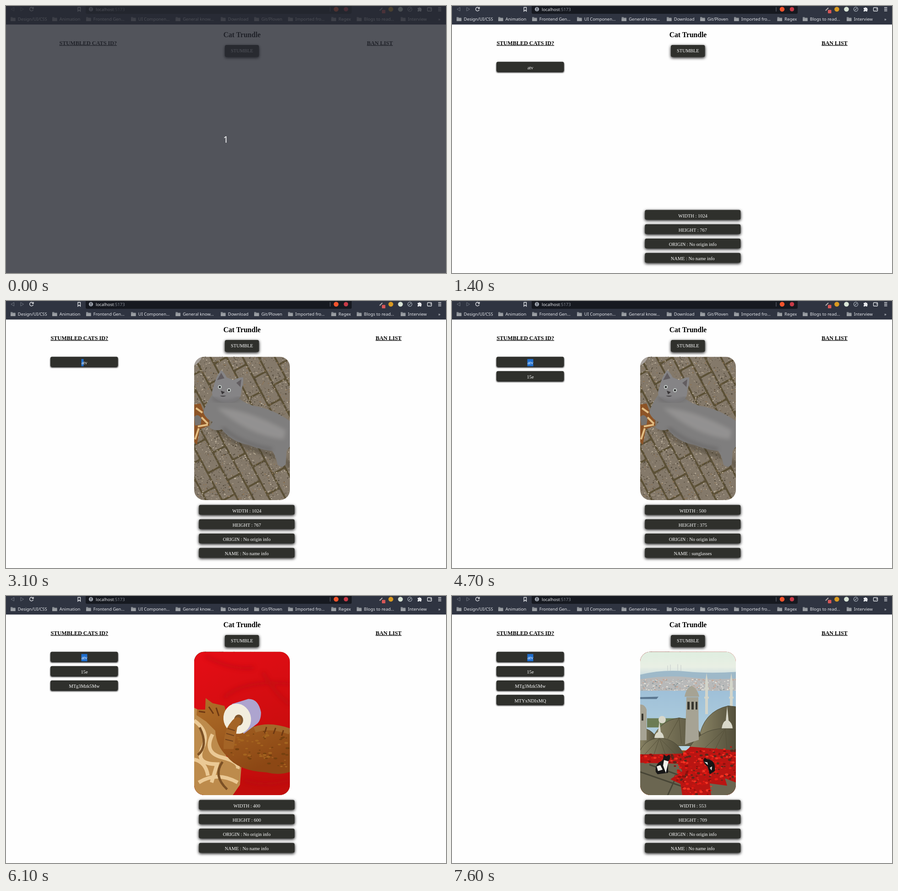
An HTML page for the animation above (8 s loop, 961 by 582 pixels).

```html
<!DOCTYPE html>
<html lang="en">
<head>
<meta charset="utf-8">
<title>Cat Trundle</title>
<style>
html, body { margin: 0; width: 100%; height: 100%; overflow: hidden; background: #fefefe; }
svg { display: block; width: 961px; height: 582px; }
.ui { font: 9.4px "Noto Sans", sans-serif; fill: #e4e6ea; }
.page { font: 10.43px "Liberation Serif", "Times New Roman", serif; text-anchor: middle; }
.title { font-size: 15.65px; font-weight: bold; }
.head { font-size: 12.2px; font-weight: bold; text-decoration: underline; }
.bar { fill: #2f302c; }
.page .light { fill: #fefefe; }
.row .bar { filter: drop-shadow(.3px 2px 1.6px #000); }
.info .bar { filter: drop-shadow(0 2.6px 3.3px #000); }
#button { filter: drop-shadow(0 2.6px 3.3px #000); }

.anim { animation: 8s step-end infinite; }
#count { animation-name: count; }
#button { animation-name: press; }
#left { animation-name: left; }
#right { animation-name: right; }
#details, #row1 { animation-name: at1400; }
#row2 { animation-name: at4700; }
#row3 { animation-name: at6000; }
#row4 { animation-name: at7500; }
#info1 { animation-name: info1; }
#info2 { animation-name: info2; }
#info3 { animation-name: info3; }
#info4 { animation-name: at7500; }
#stones { animation-name: at1500; }
#loading { animation-name: loading; }
#shades { animation-name: at4800; }
#roll { animation-name: at6100; }
#city { animation-name: at7600; }
#mark { animation-name: mark; }

@keyframes count { 0% { visibility: visible } 1.25%, to { visibility: hidden } }
@keyframes left { 0% { transform: none } 17.5%, to { transform: translateX(-19px) } }
@keyframes right { 0% { transform: none } 17.5%, to { transform: translateX(19px) } }
@keyframes at1400 { 0% { visibility: hidden } 17.5%, to { visibility: visible } }
@keyframes at1500 { 0% { visibility: hidden } 18.75%, to { visibility: visible } }
@keyframes at4700 { 0% { visibility: hidden } 58.75%, to { visibility: visible } }
@keyframes at4800 { 0% { visibility: hidden } 60%, to { visibility: visible } }
@keyframes at6000 { 0% { visibility: hidden } 75%, to { visibility: visible } }
@keyframes at6100 { 0% { visibility: hidden } 76.25%, to { visibility: visible } }
@keyframes at7500 { 0% { visibility: hidden } 93.75%, to { visibility: visible } }
@keyframes at7600 { 0% { visibility: hidden } 95%, to { visibility: visible } }
@keyframes info1 { 0%, 58.75%, to { visibility: hidden } 17.5% { visibility: visible } }
@keyframes info2 { 0%, 75%, to { visibility: hidden } 58.75% { visibility: visible } }
@keyframes info3 { 0%, 93.75%, to { visibility: hidden } 75% { visibility: visible } }
@keyframes loading { 0%, 20%, to { visibility: hidden } 18.75% { visibility: visible } }
@keyframes mark { 0% { width: 0 } 38.75% { width: 5px } 40%, to { width: 13px } }
@keyframes press {
  0%, 15%, 56.25%, 73.75%, 88.75%, to { transform: none; filter: drop-shadow(0 2.6px 3.3px #000) }
  13.75%, 55%, 71.25%, 87.5% { transform: translate(.3px, 2.2px); filter: drop-shadow(.9px .9px .4px rgba(0,0,0,.8)) }
}
</style>
</head>
<body>
<svg viewBox="0 0 961 582">
  <defs>
    <clipPath id="frame"><rect width="209" height="312.5" rx="22"/></clipPath>
    <pattern id="bricks" width="62" height="136" patternUnits="userSpaceOnUse" patternTransform="rotate(-28)">
      <rect width="62" height="136" fill="#5b5036"/>
      <g fill="#84796a">
        <rect x="2" y="2" width="27" height="64" rx="3"/><rect x="2" y="70" width="27" height="64" rx="3"/>
        <rect x="33" y="-32" width="27" height="64" rx="3"/><rect x="33" y="36" width="27" height="64" rx="3"/>
        <rect x="33" y="104" width="27" height="64" rx="3"/>
      </g>
    </pattern>
    <linearGradient id="fur" x2="0" y2="1"><stop stop-color="#b07a4d"/><stop offset=".3" stop-color="#9f5c2e"/><stop offset=".65" stop-color="#7c4123"/><stop offset="1" stop-color="#76593d"/></linearGradient>
    <linearGradient id="red" x2=".3" y2="1"><stop stop-color="#e60d16"/><stop offset="1" stop-color="#c20d0c"/></linearGradient>
    <linearGradient id="ginger" x2=".5" y2="1"><stop stop-color="#b0702a"/><stop offset="1" stop-color="#8c4714"/></linearGradient>
    <linearGradient id="sky" x2="0" y2="1"><stop stop-color="#dfeee0"/><stop offset=".55" stop-color="#e9efe4"/><stop offset="1" stop-color="#bfd5de"/></linearGradient>
    <linearGradient id="sea" x2="0" y2="1"><stop stop-color="#9fc0d8"/><stop offset="1" stop-color="#b5d3e0"/></linearGradient>
    <linearGradient id="dome"><stop stop-color="#8b8566"/><stop offset="1" stop-color="#514d39"/></linearGradient>
    <filter id="soft"><feGaussianBlur stdDeviation="4"/></filter>
  </defs>

  <g class="page">
    <text class="title" x="515.5" y="68">Cat Trundle</text>
    <text id="left" class="head anim" x="179.3" y="84.5">STUMBLED CATS ID?</text>
    <text id="right" class="head anim" x="816.6" y="84.5">BAN LIST</text>
    <g id="button" class="anim">
      <rect class="bar" x="478" y="85" width="74.5" height="26" rx="3.5"/>
      <text class="light" x="515.3" y="101.4">STUMBLE</text>
    </g>
    <g id="rows"></g>
    <g id="details" class="anim info"></g>
  </g>

  <g transform="translate(411 121.5)">
    <g id="stones" class="anim" clip-path="url(#frame)">
      <rect width="209" height="313" fill="url(#bricks)"/>
      <g id="gravel"></g>
      <path d="M0 0H17Q12 14 0 19Z" fill="#a8a29d"/>
      <path d="M40 150Q82 190 150 208T205 244" fill="none" stroke="#3b3425" stroke-width="9" opacity=".5" filter="url(#soft)"/>
      <path d="M0 104L14 102 20 118 32 124 33 150 12 158 6 192 0 186Z" fill="#8d5426"/>
      <path d="M4 112l14 10M8 152l22-4M2 180l8-24M16 132l14 14" stroke="#e2bd83" stroke-width="4"/>
      <path d="M0 131Q8 122 16 135L14 148 2 150Z" fill="#77736f"/>
      <path d="M40 82Q22 108 20 122Q26 136 40 142L33 154Q46 164 60 158Q82 186 118 192Q150 204 170 205Q178 215 182 235Q192 245 200 234L202 205 209 196V140Q170 113 130 107Q108 100 100 92Z" fill="#7f7e7e"/>
      <path d="M50 112Q110 112 200 160L196 180Q120 172 50 112Z" fill="#a09f9e" opacity=".6" filter="url(#soft)"/>
      <path d="M62 155Q100 190 170 202" fill="none" stroke="#5d5b5c" stroke-width="7" opacity=".6" filter="url(#soft)"/>
      <path d="M43 63Q48 42 59 29Q67 36 71 45L86 51Q98 44 107 45Q108 60 103 73Q104 92 88 97Q72 103 54 96Q38 88 39 76Z" fill="#858486"/>
      <path d="M50 51L59 35 66 47ZM92 57L103 49 101 66Z" fill="#625d60"/>
      <path d="M40 90Q70 108 102 88" fill="none" stroke="#5a585a" stroke-width="5" opacity=".6" filter="url(#soft)"/>
      <g fill="#c4cbc8"><circle cx="56" cy="66" r="4.2"/><circle cx="76" cy="73" r="4.2"/></g>
      <g fill="#222"><circle cx="56" cy="66" r="2.3"/><circle cx="76" cy="73" r="2.3"/></g>
      <path d="M58 74l9 3-6 5ZM56 85q7 4 14 0" fill="#393638"/>
      <rect id="loading" class="anim" y="150" width="209" height="163" fill="#fefefe"/>
    </g>

    <g id="shades" class="anim" clip-path="url(#frame)">
      <rect width="209" height="313" fill="url(#fur)"/>
      <path d="M0 0H65L48 24 0 24Z" fill="#17100d"/>
      <path d="M44 28Q62 0 80 0H209V42Q170 46 148 38Q100 26 44 28Z" fill="#d9d3c6"/>
      <path d="M85 20Q110 4 130 8M130 30Q160 8 195 12M160 36Q180 22 209 26" fill="none" stroke="#b7ad9b" stroke-width="3"/>
      <path d="M140 76Q168 44 209 36V88Q170 84 150 98Z" fill="#a97450"/>
      <path d="M158 78Q180 54 209 50V82Q180 78 158 78Z" fill="#8a5738" filter="url(#soft)"/>
      <path d="M0 24Q40 28 58 45L40 90 0 98Z" fill="#a96a3d"/>
      <path d="M95 60Q120 40 140 70L132 145H108Z" fill="#8d4b22" filter="url(#soft)"/>
      <path d="M92 45l8 55M107 38l4 65M125 40l-3 65M142 48l-11 50M76 50l13 44" stroke="#7a3d1b" stroke-width="3" opacity=".5" filter="url(#soft)"/>
      <path d="M104 178H136L144 222 106 226Z" fill="#a05f38" filter="url(#soft)"/>
      <path d="M78 242Q100 226 124 236Q150 224 164 240Q150 254 122 252Q94 254 78 242Z" fill="#b08e76" filter="url(#soft)"/>
      <path d="M108 222Q124 214 138 222Q133 235 124 238Q113 234 108 222Z" fill="#9a4a38"/>
      <path d="M124 237V243Q108 251 98 243M124 243Q142 250 152 241" fill="none" stroke="#5c2f22" stroke-width="1.5"/>
      <path d="M0 252Q60 244 100 260Q150 262 184 250V313H0Z" fill="#76583a"/>
      <path d="M180 240Q195 230 209 234V313H186Q190 282 180 240Z" fill="#c2b8a8"/>
      <g id="hairs"></g>
      <g fill="#0d0808" stroke="#e8951f" stroke-width="9">
        <path d="M-8 110Q60 106 84 126Q102 146 95 178Q83 242 35 246Q10 247-8 239Z"/>
        <path d="M217 95Q160 100 146 128Q138 156 150 188Q168 226 217 228Z"/>
      </g>
      <path d="M86 120Q102 150 119 151Q134 149 150 116L145 150 148 184Q138 173 119 173Q104 173 93 192L99 160Z" fill="#e8951f"/>
      <path d="M0 106Q60 103 86 124M150 118Q168 96 209 94" fill="none" stroke="#ffb947" stroke-width="3"/>
    </g>

    <g id="roll" class="anim" clip-path="url(#frame)">
      <rect width="209" height="313" fill="url(#red)"/>
      <path d="M25 10Q80 40 130 35M65 100Q110 60 209 70M150 45Q180 95 209 115M110 280Q150 295 209 280" fill="none" stroke="#b50a12" stroke-width="7" opacity=".5" filter="url(#soft)"/>
      <path d="M0 122L38 142 58 200 74 236 103 252 100 290 84 313H0Z" fill="#bd8b4c"/>
      <path d="M0 150Q35 175 18 210T50 245L38 285M40 180Q20 220 60 230T95 255M10 285Q50 260 95 285M0 235Q25 240 30 270" fill="none" stroke="#ebc995" stroke-width="8"/>
      <path d="M12 165Q32 205 8 225M62 240Q40 270 72 300" fill="none" stroke="#7c5125" stroke-width="5"/>
      <path d="M25 101L40 112 66 118 76 150Q120 165 209 172V262Q185 270 158 263Q95 260 70 226Q48 205 46 172L26 152 5 138 6 126 24 126Z" fill="url(#ginger)"/>
      <path d="M132 170Q165 158 209 174" fill="none" stroke="#a3682b" stroke-width="13"/>
      <path d="M10 130l14 2M32 120l10 15M48 122l6 18M158 164l-4 14M178 166l-5 13M195 171l-4 12" stroke="#6d3812" stroke-width="3"/>
      <g id="spots"></g>
      <path d="M82 114L118 103Q140 102 146 132Q146 151 136 158L108 179Z" fill="#ada4cf"/>
      <ellipse cx="94" cy="146" rx="30" ry="33" transform="rotate(-15 94 146)" fill="#f2edde"/>
      <ellipse cx="97" cy="149" rx="10" ry="12" fill="#80562d"/>
      <path d="M64 212Q64 172 80 154Q92 138 101 145Q106 153 94 165L86 212Z" fill="#a46426"/>
      <path d="M70 178l17 5M73 167l16 5M68 191l17 4" stroke="#70401a" stroke-width="2"/>
    </g>

    <g id="city" class="anim" clip-path="url(#frame)">
      <rect width="209" height="60" fill="url(#sky)"/>
      <path d="M0 50Q50 38 100 43T209 44V95H0Z" fill="#9eb9c9"/>
      <path d="M0 60Q60 50 110 56T209 58V92H0Z" fill="#b8b9b9"/>
      <g id="houses"></g>
      <rect y="85" width="209" height="130" fill="url(#sea)"/>
      <path d="M0 99L40 98 36 103H0Z" fill="#5a7690"/>
      <path d="M60 30V42M66 28V42M82 27V42M89 29V42" stroke="#c3c9c9"/>
      <path d="M15 145H110V165H15Z" fill="#6c7c55"/>
      <g fill="#d3d5ca"><path d="M142 136V66L145 46 148 66V136ZM196 136V66L199 46 202 66V136Z"/><path d="M140 78h10v4h-10zM140 98h10v4h-10zM194 78h10v4h-10zM194 98h10v4h-10z"/></g>
      <g fill="url(#dome)" stroke="#4b4937">
        <path d="M128 190Q138 130 192 118L212 120V190Z"/>
        <path d="M20 205Q38 150 85 144Q128 148 140 205Z"/>
        <path d="M0 165Q24 168 34 185V215H0Z"/>
        <path d="M102 220Q125 168 185 167L212 170V230H102Z"/>
        <path d="M-4 224Q8 190 42 188Q80 190 95 224Z"/>
      </g>
      <path d="M42 188L10 224M42 188L30 224M42 188L55 224M42 188L78 224M186 168L130 220M186 168L160 220M186 168L190 220M85 145L60 190M85 145L90 200" stroke="#555039"/>
      <g fill="#a6a394">
        <path d="M98 202L101 99H127L128 192Z"/><path d="M97 98Q100 80 112 74Q125 80 129 98Z"/>
        <path d="M0 115Q10 114 14 126V193H0Z"/>
      </g>
      <path d="M103 109h5v17h-5zM112 109h5v17h-5zM121 109h4v17h-4zM3 135h4v15h-4z" fill="#37362f"/>
      <g fill="#d9d8ca"><path d="M31 188Q32 178 39 175L42 150 45 175Q51 179 52 188Z"/><path d="M178 167Q180 153 187 150L190 118 193 150Q201 155 202 167Z"/><circle cx="48" cy="148" r="8"/></g>
      <path d="M0 238L60 222 209 248V313H0Z" fill="#6b6651"/>
      <path d="M0 262L110 300M20 246L130 285M60 313L75 280" stroke="#474536" stroke-width="3"/>
      <path d="M0 224L92 222 110 207 209 215V285L185 276 190 292 152 287 155 313H92L88 288 66 278 92 260 82 244 0 242Z" fill="#b91512"/>
      <g id="leaves"></g>
      <path d="M34 262Q31 244 49 237L52 224 57 228 64 224Q68 233 61 239L61 264 38 267Z" fill="#171717"/>
      <path d="M52 236L62 239 56 264 50 248ZM36 250l8-3 5 10-10 3Z" fill="#efefe9"/>
      <path d="M138 236L141 231 147 235Q166 236 163 260L152 267 147 250Q139 245 138 236Z" fill="#141414"/>
      <path d="M140 240l7 1 1 6ZM152 253l5-3-1 9Z" fill="#ddd"/>
    </g>
  </g>

  <g class="ui">
    <rect width="961" height="40.4" fill="#2f3441"/>
    <path d="M174 0H755V14Q755 17 752 17H177Q174 17 174 14Z" fill="#161920"/>
    <g fill="none" stroke="#6d737e"><path d="M17.5 3V11L11 7ZM32 3V11L38.5 7Z"/><path d="M708 2.5V12"/></g>
    <g fill="none" stroke="#e4e6ea" stroke-width="1.3">
      <path d="M59 4.5A4 4 0 1 0 59.5 8M60 2V5.5H56.5"/>
      <path d="M157 3H162.5V11.5L159.8 9 157 11.5Z"/>
      <path d="M944 3.5H950.5M944 7H950.5M944 10.5H950.5"/>
      <rect x="920.5" y="3.5" width="9" height="7.5" rx="1"/><path d="M926 6.5H930"/>
      <g stroke="#a4abb5"><circle cx="882" cy="7" r="4.6"/><path d="M879.5 9.5L884.5 4.5"/></g>
      <path d="M816 10L822 4" stroke="#b8aeae" stroke-width="2"/>
    </g>
    <circle cx="185.5" cy="7" r="4.7" fill="#9ba1ab"/>
    <path d="M185.5 4V7.5M185.5 8.5V10" stroke="#161920" stroke-width="1.3"/>
    <text x="196" y="10.5">localhost<tspan fill="#858b95">:5173</tspan></text>
    <circle cx="721" cy="7" r="5.3" fill="#f2532c"/>
    <circle cx="742.5" cy="7" r="4.8" fill="#c73a46"/>
    <rect x="821" y="8.5" width="7.5" height="7.5" rx="1" fill="#d95757"/>
    <circle cx="840.5" cy="7" r="5.3" fill="#d99a21"/>
    <circle cx="861.5" cy="7" r="5.3" fill="#d9e5d7"/>
    <path d="M899 4H901.5A1.7 1.7 0 0 1 904.8 4H907V6.5A1.7 1.7 0 0 1 907 9.5V12H904.5A1.6 1.6 0 0 0 901.5 12H899V9.5A1.6 1.6 0 0 0 899 6.5Z"/>
    <g id="bookmarks"></g>
    <text x="944" y="31.5">»</text>
  </g>

  <g id="count" class="anim">
    <rect width="961" height="582" fill="#272a32" opacity=".8"/>
    <text x="480" y="298" text-anchor="middle" font-family="Noto Sans, sans-serif" font-size="19.5" fill="#fff">1</text>
  </g>
</svg>

<script>
const fill = (id, html) => { document.getElementById(id).innerHTML = html; };
const bar = (x, y, w) => `<rect class="bar" x="${x}" y="${y}" width="${w}" height="21.3" rx="3.5"/>`;
const label = (x, y, text) => `<text class="light" x="${x}" y="${y + 16.3}">${text}</text>`;
const step = 31.25;

const ids = ["atv", "15e", "MTg3Mzk5Mw", "MTYxNDIxMQ"];
fill("rows", ids.map((id, i) => {
  const y = 121.6 + i * step;
  const mark = i ? "" : `<rect id="mark" class="anim" x="164.5" y="126.5" width="0" height="15.8" fill="#1f6fcf"/>`;
  return `<g id="row${i + 1}" class="row anim">${bar(97, y, 147.5)}${mark}${label(171, y, id)}</g>`;
}).join(""));

const cats = [[1024, 767], [500, 375, "sunglasses"], [400, 600], [553, 709]];
const lineY = i => 444.4 + i * step;
fill("details", [0, 1, 2, 3].map(i => bar(421.3, lineY(i), 209)).join("") +
  label(525.8, lineY(2), "ORIGIN : No origin info") +
  cats.map(([w, h, name = "No name info"], i) => `<g id="info${i + 1}" class="anim">` +
    label(526, lineY(0), `WIDTH : ${w}`) + label(525.8, lineY(1), `HEIGHT : ${h}`) +
    label(525.8, lineY(3), `NAME : ${name}`) + `</g>`).join(""));

const folders = [[10, "Design/UI/CSS"], [101, "Animation"], [175, "Frontend Gen…"], [273, "UI Componen…"],
  [370.5, "General know…"], [469, "Download"], [542, "Git/Ploven"], [616, "Imported fro…"],
  [710.5, "Regex"], [766, "Blogs to read…"], [862, "Interview"]];
fill("bookmarks", folders.map(([x, name]) =>
  `<path d="M${x} 24h4l1 1.5h5.5v7.5h-10.5z" fill="#80858c"/>` +
  `<path d="M${x} 27h10.5v6h-10.5z" fill="#9a9ea3"/><text x="${x + 15.8}" y="31.8">${name}</text>`).join(""));

// Seeded specks give the pictures their grain.
let seed = 7;
const rnd = () => (seed = seed * 16807 % 2147483647) / 2147483647;
function specks(id, n, [x, y, w, h], [sw, sh], colours, inside = () => true) {
  let out = "";
  for (let i = 0; i < n; i++) {
    const px = x + rnd() * w, py = y + rnd() * h, c = colours[Math.floor(rnd() * colours.length)];
    const k = .5 + rnd() * .8;
    if (inside(px, py)) out += `<ellipse cx="${px.toFixed(1)}" cy="${py.toFixed(1)}" rx="${(sw * k).toFixed(1)}" ry="${(sh * k).toFixed(1)}" fill="${c}"/>`;
  }
  fill(id, out);
}
specks("gravel", 2200, [0, 0, 209, 313], [1.2, 1], ["#a99c88", "#5d5344", "#726656", "#c1b5a1", "#8c7354", "#4f4738"]);
specks("hairs", 160, [0, 255, 180, 58], [1.5, 4], ["#8d7050", "#5c432c", "#9c8160"], (x, y) => y > 254 + x * .06);
specks("spots", 80, [80, 168, 125, 90], [3.5, 1.8], ["#74400f", "#a4641f"], (x, y) => y < 205 + x * .25 && y > 160 + x * .08);
specks("houses", 260, [0, 60, 209, 25], [1.7, 1.1], ["#e4e2da", "#c5a595", "#8d9a9d", "#d4d5d2"]);
specks("leaves", 520, [0, 207, 209, 106], [3, 2], ["#e51b14", "#f23222", "#8c100d", "#c91410", "#59291c"],
  (x, y) => y < 242 ? y > 222 - Math.max(0, x - 85) * .15 : x > 75 && y < 280 || x > 92 && x < 155);
</script>
</body>
</html>
```
